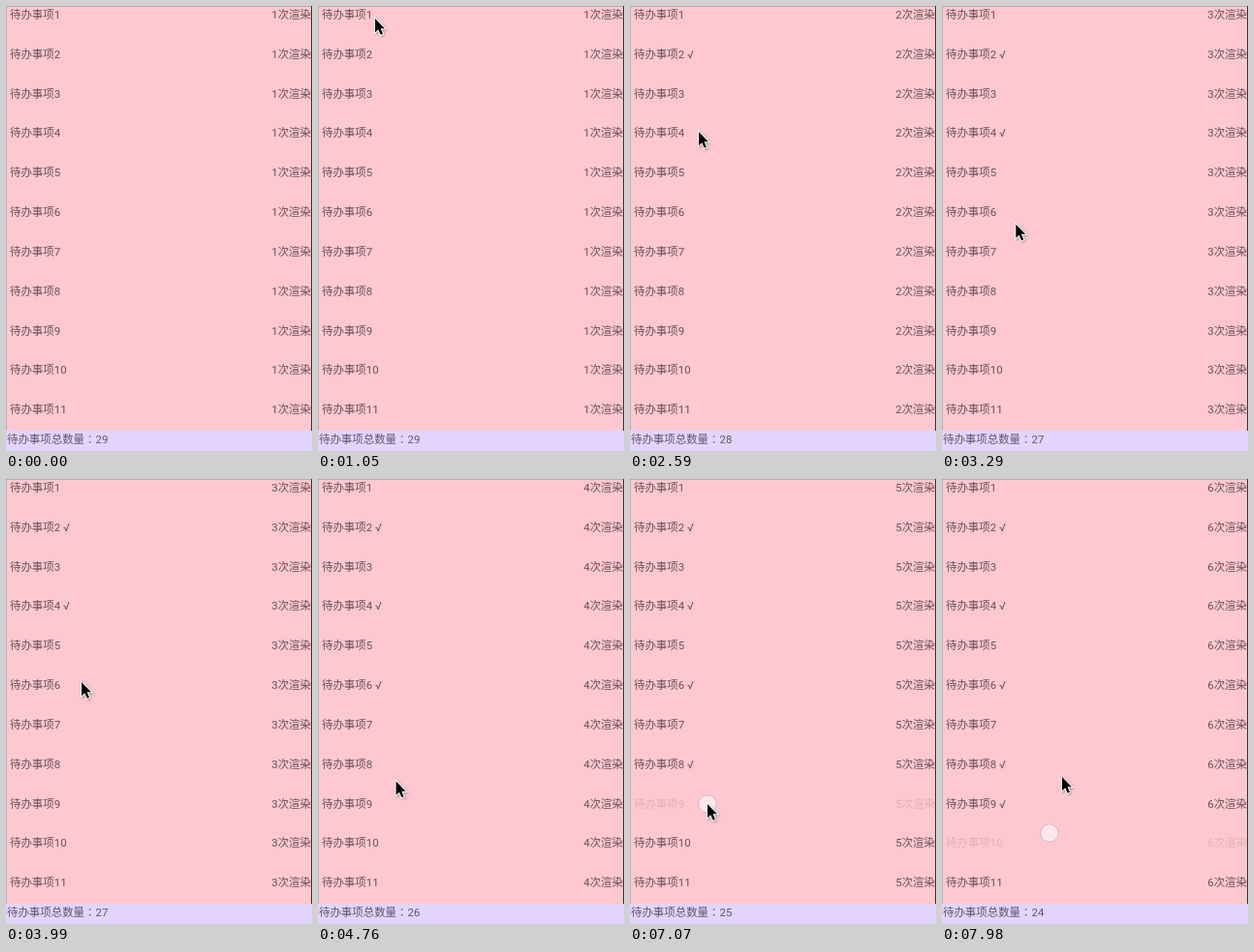
An HTML page that plays this animation: 316 px wide and 460 px high, repeating every 8 s.

```html
<!DOCTYPE html>
<html lang="zh-CN">
<head>
<meta charset="utf-8">
<title>待办事项</title>
<style>
  html, body { margin: 0; width: 100%; height: 100%; overflow: hidden; }
  svg { display: block; width: 316px; height: 460px; }
  text {
    font: 11.45px Roboto, "Noto Sans CJK SC", "Noto Sans CJK", sans-serif;
    fill: #6a5056;
    white-space: pre;
  }
  .count { text-anchor: end; }
  #total { fill: #5f5668; }
  .colon { font-family: "Noto Sans CJK TC", "Noto Sans CJK", sans-serif; }
  #touch { fill: rgba(255, 255, 255, .55); stroke: #cdb0d0; }
  #cursor {
    stroke: #fff;
    stroke-width: 2;
    paint-order: stroke;
    filter: drop-shadow(1px 1.5px 1px rgba(0, 0, 0, .3));
  }
</style>
</head>
<body>
<svg viewBox="0 0 316 460">
  <rect width="316" height="460" fill="#ffc8d0"/>
  <rect width="316" height="1" fill="#b9a9ae"/>
  <rect width="1" height="460" fill="#b9b0b6"/>
  <rect x="315" width="1" height="460" fill="#3a3034"/>
  <rect y="439" width="316" height="21" fill="#e2d4ff"/>
  <g id="rows"></g>
  <text id="total" x="1" y="452">待办事项总数量<tspan class="colon" lang="zh-TW">：</tspan><tspan id="left"></tspan></text>
  <circle id="touch" r="9.3"/>
  <path id="cursor" d="M1 2V16.2L4.3 13.2L6.8 18.8L9 17.8L6.6 12.2H11Z"/>
</svg>
<script>
const LOOP = 8000, STEP = 70, ROWS = 11, TODOS = 29;
const PITCH = 40.82, RELEASE = 280, UPDATE = 420, FADE = 210;
const NS = 'http://www.w3.org/2000/svg';
const $ = id => document.getElementById(id);

// Each tap: row, press time and pointer tip
const taps = [
  { row: 2, at: 1470, x: 66, y: 46 },
  { row: 4, at: 2660, x: 70, y: 128 },
  { row: 6, at: 4130, x: 77, y: 208 },
  { row: 8, at: 5320, x: 80, y: 290 },
  { row: 9, at: 6860, x: 79, y: 334 },
  { row: 10, at: 7910, x: 110, y: 364, hold: 0 }
];

// The pointer rests on each stop from arrive to leave
const stops = [
  { arrive: 210, leave: 210, x: 88, y: 268 },
  { arrive: 1050, leave: 1120, x: 58, y: 11, back: 0 },
  ...taps.map(({ at, x, y, hold = 210 }) => ({ arrive: at - 140, leave: at + hold, x, y })),
  { arrive: 7980, leave: LOOP, x: 123, y: 306 }
];

const lerp = (a, b, k) => a + (b - a) * k;
const easeOutBack = (k, c) => 1 + (c + 1) * (k - 1) ** 3 + c * (k - 1) ** 2;

function pointerAt(t) {
  const i = stops.findIndex(s => t <= s.leave);
  const to = stops[i], from = stops[i - 1] || to;
  if (t >= to.arrive) return [to.x, to.y];
  const k = (t - from.leave) / (to.arrive - from.leave);
  const { back = 3 } = to;
  return [lerp(from.x, to.x, easeOutBack(k, 0)), lerp(from.y, to.y, easeOutBack(k, back))];
}

function addText(parent, x, y, name) {
  const el = document.createElementNS(NS, 'text');
  el.setAttribute('x', x);
  el.setAttribute('y', y);
  el.setAttribute('class', name);
  return parent.appendChild(el);
}

const rows = Array.from({ length: ROWS }, (_, i) => {
  const g = $('rows').appendChild(document.createElementNS(NS, 'g'));
  const y = Math.round(13 + PITCH * i);
  return { g, label: addText(g, 4, y, 'label'), count: addText(g, 315, y, 'count') };
});

function place(el, x, y) {
  el.setAttribute('transform', `translate(${x} ${y})`);
}

function rowOpacity(tap, t) {
  if (!tap || t < tap.at) return 1;
  return Math.min(1, .2 + .8 * Math.max(0, t - tap.at - UPDATE + STEP) / FADE);
}

function draw(t) {
  const isDone = tap => t >= tap.at + UPDATE;
  const done = taps.filter(isDone).length;
  rows.forEach(({ g, label, count }, i) => {
    const tap = taps.find(p => p.row === i + 1);
    label.textContent = `待办事项${i + 1}${tap && isDone(tap) ? ' √' : ''}`;
    count.textContent = `${done + 1}次渲染`;
    g.setAttribute('opacity', rowOpacity(tap, t));
  });
  $('left').textContent = TODOS - done;

  const held = taps.find(p => t >= p.at && t < p.at + RELEASE);
  $('touch').style.display = held ? '' : 'none';
  if (held) place($('touch'), held.x + 1, held.y + 2);

  $('cursor').style.display = t < stops[0].arrive ? 'none' : '';
  place($('cursor'), ...pointerAt(t));
}

const start = performance.now();
function tick() {
  const t = (performance.now() - start) % LOOP;
  draw(Math.floor(t / STEP) * STEP);
  requestAnimationFrame(tick);
}
tick();
</script>
</body>
</html>
```
